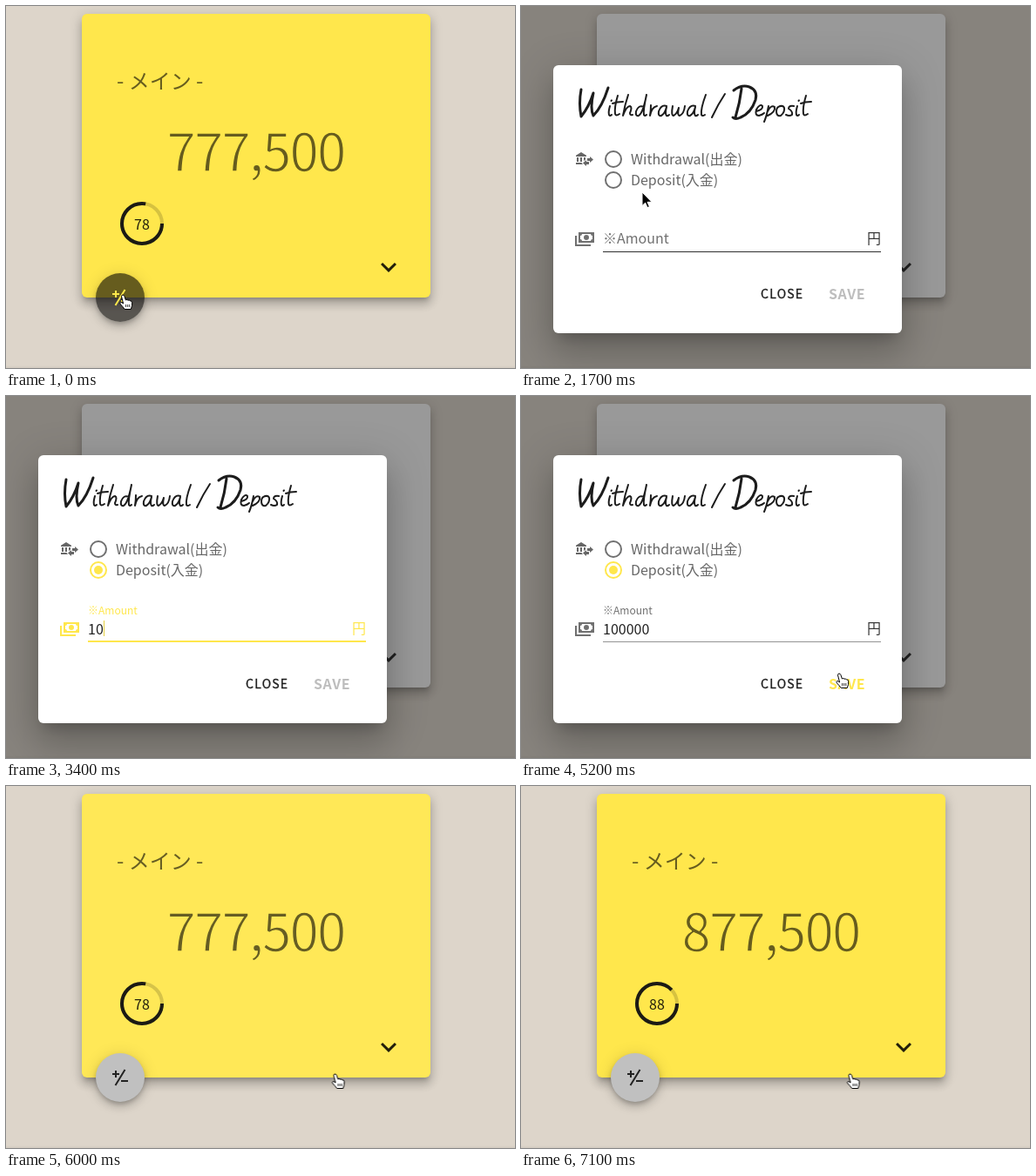
These frames come from a looping animation (584x416 px, 7.4 s). An HTML page:

```html
<!DOCTYPE html>
<html lang="ja">
<head>
<meta charset="utf-8">
<title>Withdrawal / Deposit</title>
<style>
@property --tone { syntax: "<color>"; inherits: true; initial-value: #ffe74c; }
@property --focus { syntax: "<percentage>"; inherits: true; initial-value: 0%; }

html, body { margin: 0; width: 100%; height: 100%; overflow: hidden; }
body { background: #ddd5ca; font-family: "Noto Sans CJK JP", "Noto Sans CJK", "Noto Sans", sans-serif; }
svg { position: absolute; left: 0; top: 0; overflow: visible; }
#stage { position: relative; width: 584px; height: 416px; overflow: hidden; background: #ddd5ca; --yellow: #ffe74c; }
#stage, #stage * { animation: 7.4s ease-in-out infinite; animation-name: none; }
.floor { position: absolute; left: 0; right: 0; bottom: 0; height: 3px; background: linear-gradient(transparent, rgba(0,0,0,.05)); }

.card, .fab, .overlay, .dialog { position: absolute; }
#stage .card {
  left: 87px; top: 9px; width: 400px; height: 326px; border-radius: 6px;
  background: var(--tone); animation-name: tone;
  box-shadow: 0 5px 5px -3px rgba(0,0,0,.2), 0 8px 10px 1px rgba(0,0,0,.14), 0 3px 14px 2px rgba(0,0,0,.12);
}
.soft { fill: rgba(0,0,0,.6); }
.ink { fill: rgba(0,0,0,.87); }
.sum { font-size: 60px; font-weight: 300; letter-spacing: -1.8px; text-anchor: middle; }
.thin { stroke: var(--tone); stroke-width: 1.5px; }
.ring { fill: none; stroke-width: 4; }

#stage .fab {
  left: 103px; top: 307px; width: 56px; height: 56px; border-radius: 50%; animation-name: fab;
  box-shadow: 0 3px 5px -1px rgba(0,0,0,.2), 0 6px 10px rgba(0,0,0,.14), 0 1px 18px rgba(0,0,0,.12);
}
#stage .sign { fill: none; stroke-width: 2; animation-name: sign; }
#stage .overlay { inset: 0; background: #212121; animation-name: overlay; }

#stage .dialog {
  left: 37px; top: 68px; width: 400px; height: 308px; border-radius: 6px; background: #fff;
  animation-name: dialog, focus;
  box-shadow: 0 11px 15px -7px rgba(0,0,0,.2), 0 24px 38px 3px rgba(0,0,0,.14), 0 9px 46px 8px rgba(0,0,0,.12);
}
.dialog text { font-size: 16px; }
#title path { fill: none; stroke: #1c1c1c; stroke-width: 2; stroke-linecap: round; stroke-linejoin: round; }
#title .cap { stroke-width: 3; }
.tint { fill: color-mix(in srgb, var(--yellow) var(--focus), rgba(0,0,0,.56)); }
.unit { fill: color-mix(in srgb, var(--yellow) var(--focus), rgba(0,0,0,.8)); }
.radio { fill: none; stroke: rgba(0,0,0,.56); stroke-width: 2; }
#stage .picked { animation-name: picked; }
.dot, .ripple, .bar { transform-box: fill-box; transform-origin: center; fill: var(--yellow); }
#stage .dot { animation-name: dot; }
#stage .ripple { animation-name: ripple; }
#stage .line { animation-name: line; }
#stage .bar { animation-name: bar; }
#stage .label { animation-name: label; }
.dialog .close { font-size: 14px; font-weight: 500; letter-spacing: 1.25px; stroke: rgba(0,0,0,.87); stroke-width: .35px; }
#stage .save { font-weight: 700; letter-spacing: .6px; animation-name: save; }
#stage .value {
  position: absolute; left: 57px; top: 190px; height: 18px; overflow: hidden; white-space: nowrap;
  font-size: 16px; line-height: 18px; color: rgba(0,0,0,.87); border-right: 1px solid;
  animation-name: type, caret; animation-timing-function: step-end;
}
#stage .pointer { animation-name: move; }
#stage .arrow, #stage .hand, #stage .beam { animation-timing-function: step-end; stroke-linejoin: round; }
#stage .arrow { animation-name: arrow; }
#stage .hand { animation-name: hand; }
#stage .beam { animation-name: beam; }

@keyframes tone {
  0%, 14.19% { --tone: #ffe74c; }
  15.95%, 77.4% { --tone: #fff; animation-timing-function: ease-out; }
  82%, 100% { --tone: #ffe74c; }
}
@keyframes fab {
  0%, 13.8% { background: rgba(0,0,0,.6); }
  16.5%, 100% { background: #c0c0c0; }
}
@keyframes sign {
  0%, 15.5% { stroke: #ffe74c; }
  18.9%, 100% { stroke: #222; }
}
@keyframes overlay {
  0%, 15.5% { opacity: 0; animation-timing-function: cubic-bezier(.25,.8,.25,1); }
  19.6%, 75.6% { opacity: .46; }
  80.4%, 100% { opacity: 0; }
}
@keyframes dialog {
  0%, 15.54% { opacity: 0; transform: scale(.5); animation-timing-function: cubic-bezier(.25,.8,.25,1); }
  19.59%, 75% { opacity: 1; transform: none; animation-timing-function: cubic-bezier(.25,.8,.25,1); }
  79.05%, 100% { opacity: 0; transform: scale(.5); }
}
@keyframes focus {
  0%, 35.14% { --focus: 0%; }
  39.19%, 55.2% { --focus: 100%; }
  59.46%, 100% { --focus: 0%; }
}
@keyframes picked {
  0%, 27.03% { stroke: rgba(0,0,0,.56); }
  29.05%, 100% { stroke: #ffe74c; }
}
@keyframes dot {
  0%, 27.03% { transform: scale(0); }
  29.05%, 100% { transform: none; }
}
@keyframes ripple {
  0%, 27.03% { transform: scale(.3); opacity: 0; }
  29.05% { transform: none; opacity: .28; }
  32% { opacity: .28; }
  36.5%, 100% { transform: none; opacity: 0; }
}
@keyframes line {
  0%, 15.5% { fill: rgba(0,0,0,.42); }
  18%, 22.97% { fill: rgba(0,0,0,.82); }
  27%, 32% { fill: rgba(0,0,0,.42); }
  35%, 55.4% { fill: rgba(0,0,0,.82); }
  60%, 100% { fill: rgba(0,0,0,.42); }
}
@keyframes bar {
  0%, 35.14% { transform: scaleX(0); opacity: 1; }
  39.19%, 55.2% { transform: none; opacity: 1; }
  59.46%, 100% { transform: none; opacity: 0; }
}
@keyframes label {
  0%, 35.14% { transform: translate(94px, 273px); }
  39.19%, 100% { transform: translate(94px, 251px) scale(.75); }
}
@keyframes save {
  0%, 58% { fill: rgba(0,0,0,.26); }
  60.81%, 100% { fill: #ffe74c; }
}
@keyframes type {
  0% { width: 0; }
  44.32% { width: 1ch; }
  45.68% { width: 2ch; }
  48.38% { width: 3ch; }
  49.73% { width: 4ch; }
  52.43% { width: 5ch; }
  53.78%, 100% { width: 6ch; }
}
@keyframes caret {
  0% { border-color: transparent; }
  36% { border-color: #e6cf3f; }
  55.2%, 100% { border-color: transparent; }
}
@keyframes move {
  0%, 1% { transform: translate(135px, 332px); }
  5.41%, 16.5% { transform: translate(132px, 335px); }
  22.5%, 23.2% { transform: translate(139px, 214px); }
  26.35%, 29.73% { transform: translate(106px, 200px); }
  34%, 58% { transform: translate(150px, 265px); }
  67.57%, 71.5% { transform: translate(366px, 319px); }
  79.5%, 100% { transform: translate(378.5px, 331px); }
}
@keyframes arrow {
  0% { opacity: 0; }
  14.6% { opacity: 1; }
  25.4% { opacity: 0; }
  58.1% { opacity: 1; }
  65.5%, 100% { opacity: 0; }
}
@keyframes hand {
  0% { opacity: 1; }
  14.6% { opacity: 0; }
  25.4% { opacity: 1; }
  32.5% { opacity: 0; }
  65.5%, 100% { opacity: 1; }
}
@keyframes beam {
  0% { opacity: 0; }
  32.5% { opacity: 1; }
  43.2%, 100% { opacity: 0; }
}
</style>
</head>
<body>
<div id="stage">
  <div class="floor"></div>

  <div class="card">
    <svg width="400" height="326" viewBox="87 9 400 326">
      <text class="soft" x="127" y="95" font-size="24">- メイン -</text>
      <text class="soft sum" id="sum" x="286.500" y="190">777,500</text>
      <circle class="ring" cx="156" cy="250" r="23" stroke="rgba(0,0,0,.16)"/>
      <circle class="ring" id="arc" cx="156" cy="250" r="23" stroke="#1b1a14" pathLength="100" stroke-dasharray="78 100"/>
      <text class="ink" id="rate" x="156" y="257" font-size="16" text-anchor="middle">78</text>
      <path class="ink" transform="translate(421 282) scale(1.5)" d="M7.4 8.6 12 13.2l4.6-4.6L18 10l-6 6-6-6z"/>
    </svg>
  </div>

  <div class="fab">
    <svg width="56" height="56" viewBox="103 307 56 56">
      <path class="sign" d="M122 331h8M126 327v8M136.500 326 125.500 344M132 339h8"/>
    </svg>
  </div>

  <div class="overlay"></div>

  <div class="dialog">
    <svg width="400" height="308" viewBox="37 68 400 308">
      <g id="title" role="img" aria-label="Withdrawal / Deposit"></g>
      <path class="soft" transform="translate(61 164)" d="M15 14V11H18V9L22 12.500 18 16V14ZM14 7.700V9H2V7.700L8 4ZM7 10H9V15H7ZM3 10H5V15H3ZM13 10V12.500L11 14.300V10ZM9.100 16 8.500 16.500 10.200 18H2V16ZM17 15V18H14V20L10 16.500 14 13V15Z"/>
      <circle class="radio" cx="106" cy="176" r="9"/>
      <text class="soft" x="126" y="182">Withdrawal(出金)</text>
      <circle class="ripple" cx="106" cy="200" r="21"/>
      <circle class="radio picked" cx="106" cy="200" r="9"/>
      <circle class="dot" cx="106" cy="200" r="5"/>
      <text class="soft" x="126" y="206">Deposit(入金)</text>

      <path class="tint" fill-rule="evenodd" transform="translate(61 254)" d="M5 6H23V18H5ZM14 9a3 3 0 0 1 0 6a3 3 0 0 1 0-6M9 8A2 2 0 0 1 7 10V14A2 2 0 0 1 9 16H19A2 2 0 0 1 21 14V10A2 2 0 0 1 19 8ZM1 10H3V20H19V22H1Z"/>
      <text class="tint label">※Amount</text>
      <text class="unit" x="397" y="273">円</text>
      <rect class="line" x="94" y="282" width="319" height="1"/>
      <rect class="bar" x="94" y="281" width="319" height="2"/>

      <text class="ink close" x="275" y="336">CLOSE</text>
      <text class="save" x="353" y="337">SAVE</text>
    </svg>
    <div class="value">100000</div>
  </div>

  <svg width="584" height="416">
    <g class="pointer">
      <path class="arrow" fill="#000" stroke="#fff" d="M0 0V15.500L3.600 12.200 6 17.600 8.400 16.600 6 11.300H11Z"/>
      <g class="hand" fill="#fff" stroke="#000">
        <path d="M-2.500 1.800Q-2.500 0-1 0Q.4 0 .9 1.500L2.400 6Q4 4.800 5 6.200Q6.700 5.300 7.500 7Q9.500 6.500 9.700 8.800Q10 12.500 8.300 16.500H1.200Q-1 13.500-3.600 10.800Q-4.600 9.300-3.400 8.600Q-2.200 8.200-.4 10Z"/>
        <path fill="none" stroke-width=".8" d="M2.600 11v3M4.700 11v3M6.800 11v3"/>
      </g>
      <path class="beam" fill="none" stroke="#000" d="M-3-8Q0-8 0-6V6Q0 8-3 8M3-8Q0-8 0-6M0 6Q0 8 3 8"/>
    </g>
  </svg>
</div>

<script>
const $ = id => document.getElementById(id);

// Brush lettering for the heading: strokes per letter, baseline at y = 0.
const strokes = {
  W: "M3-30Q0-14 3 1Q12-10 17-26Q13-8 17 0Q27-10 34-32",
  D: "M10-31Q8-14 3 2M1-29Q10-36 19-33Q29-29 26-18Q21-3 9 2Q3 5 0 2",
  "/": "M15-25Q7-13 0 2",
  i: "M3-11Q1-4 2-1Q3 1 5-1M4.500-17l.5-.6",
  t: "M6-23Q2-10 3-2Q4 1 8-2M0-14Q5-16 12-16",
  h: "M6-24Q2-12 0 0Q4-11 8-11Q11-10 8-3Q8 0 11-1",
  d: "M10-10Q4-13 1-5Q0 1 4 0Q9-3 13-24Q9-6 10-1Q11 1 13-1",
  r: "M2-12Q2-6 1 0Q3-10 9-11",
  a: "M9-11Q3-13 0-5Q-1 1 3 0Q7-2 9-10Q7-2 9 0Q10 1 12-1",
  w: "M1-11Q-1 0 2 0Q6-2 8-9Q6 0 9 0Q14-2 15-11",
  l: "M6-24Q0-8 1-1Q2 1 5-1",
  e: "M1-5Q9-7 8-11Q5-14 1-7Q-1 0 4 0Q8-1 10-3",
  p: "M3-11Q1 0-2 7M2-5Q6-13 10-10Q11-4 2 0",
  o: "M6-11Q0-11 0-5Q0 1 5 0Q10-4 9-9Q8-12 4-11",
  s: "M9-11Q3-12 3-8Q8-5 7-1Q4 1 0-1"
};
const starts = [66, 99, 105, 117, 131, 147, 158, 173, 191, 206, 219, 243, 269, 281, 293, 304, 314, 321];
$("title").innerHTML = [..."Withdrawal/Deposit"].map((c, i) =>
  `<path${/[WD]/.test(c) ? ' class="cap"' : ""} transform="translate(${starts[i]} 126)" d="${strokes[c]}"/>`
).join("");

// Slim the large figures when the font has no light weight.
const pen = document.createElement("canvas").getContext("2d");
const widthAt = weight => {
  pen.font = `${weight} 60px "Noto Sans CJK JP", "Noto Sans CJK", "Noto Sans", sans-serif`;
  return pen.measureText("Withdrawal").width;
};
if (widthAt(300) === widthAt(400)) $("sum").classList.add("thin");

const LOOP = 7400, FROM = 777500, GAIN = 100000;
let begin;
function tick(now) {
  begin ??= now;
  const t = (now - begin) % LOOP;
  const p = Math.min(1, Math.max(0, (t - 6200) / 850));
  const sum = Math.round(FROM + GAIN * (1 - (1 - p) ** 3));
  const rate = Math.round(sum / 10000);
  $("sum").textContent = sum.toLocaleString("en-US");
  $("rate").textContent = rate;
  $("arc").setAttribute("stroke-dasharray", `${rate} 100`);
  requestAnimationFrame(tick);
}
requestAnimationFrame(tick);
</script>
</body>
</html>
```
